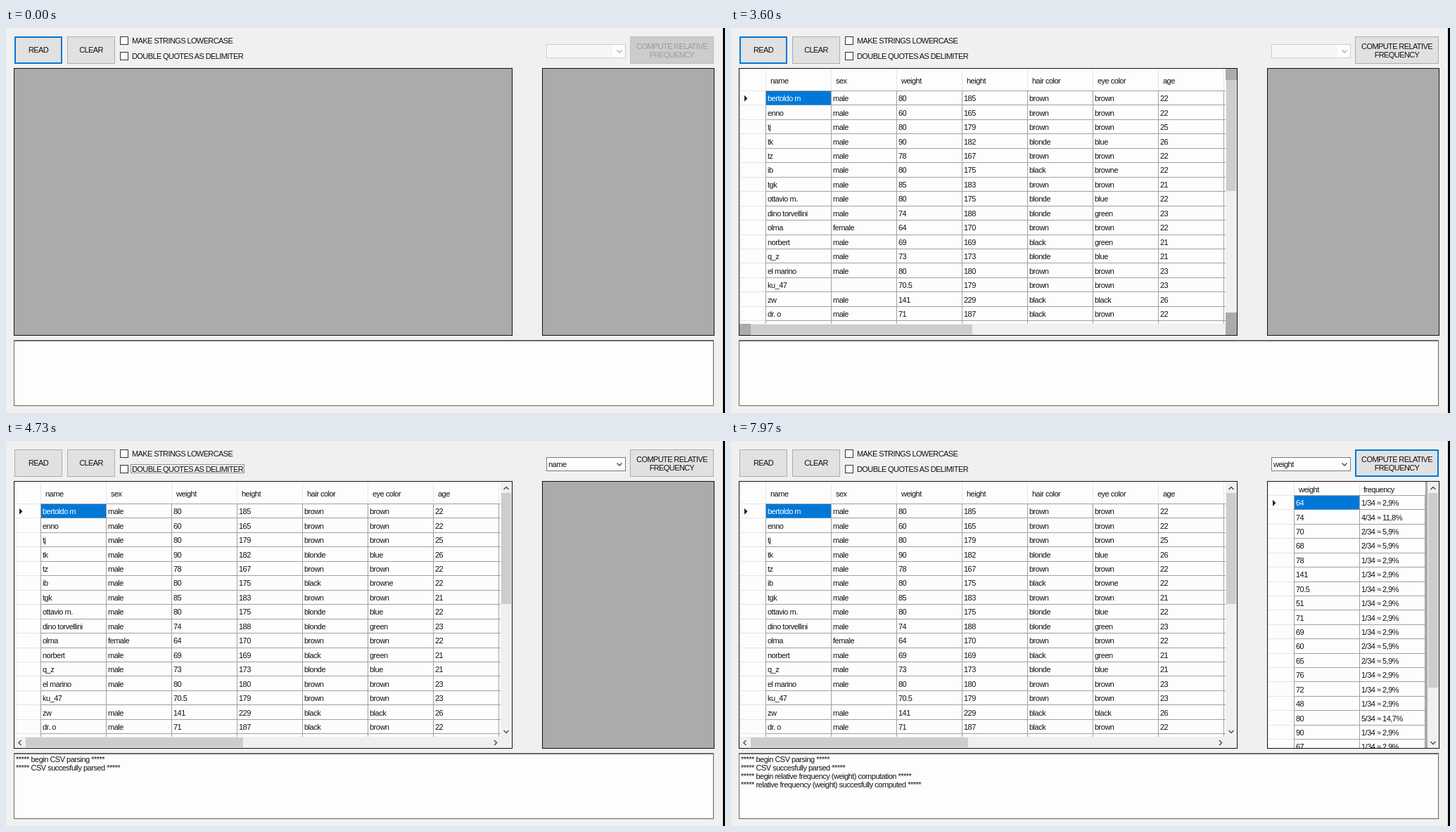
An HTML page that plays this animation: 1022 px wide and 548 px high, repeating every 8000 ms.

```html
<!DOCTYPE html>
<html lang="en">
<head>
<meta charset="utf-8">
<title>CSV frequency tool</title>
<style>
html, body { margin: 0; width: 100%; height: 100%; overflow: hidden; background: #f0f0f0; }
svg { display: block; }
text { font: 11px "Liberation Sans", Arial, sans-serif; letter-spacing: -.5px; white-space: pre; fill: #111; }
.caps { letter-spacing: -.6px; }
</style>
</head>
<body>
<svg id="stage" width="1022" height="548" viewBox="0 0 1022 548"></svg>
<script>
const LOOP = 8000;
const BLUE = '#0078d7', GRAY = '#ababab', FACE = '#f0f0f0', WHITE = '#fdfdfd';
const GRID = '#a0a0a0', FAINT = '#e6e6e6', THUMB = '#cdcdcd';
const stage = document.getElementById('stage');

function add(parent, tag, attrs = {}, content) {
  const el = document.createElementNS('http://www.w3.org/2000/svg', tag);
  for (const key in attrs) el.setAttribute(key, attrs[key]);
  if (content !== undefined) el.textContent = content;
  parent.appendChild(el);
  return el;
}
const group = (parent = stage) => add(parent, 'g');
const box = (parent, x, y, width, height, fill) => add(parent, 'rect', { x, y, width, height, fill });
const frame = (parent, x, y, width, height, fill, stroke) =>
  add(parent, 'rect', { x: x + .5, y: y + .5, width: width - 1, height: height - 1, fill, stroke });
const label = (parent, x, y, content, attrs) => add(parent, 'text', { x, y, ...attrs }, content);
const line = (parent, d, stroke, width = 1) =>
  add(parent, 'path', { d, stroke, fill: 'none', 'stroke-width': width });
const show = (el, on) => el.setAttribute('display', on ? 'inline' : 'none');

// Chevron pointing along (dx, dy)
function chevron(parent, x, y, dx, dy, color = '#505050') {
  const point = side => `${x - dx * 2 + dy * 3.5 * side} ${y - dy * 2 + dx * 3.5 * side}`;
  return line(parent, `M${point(-1)}L${x + dx * 1.5} ${y + dy * 1.5}L${point(1)}`, color, 1.5);
}

function button(x, width, lines) {
  const g = group();
  const face = frame(g, x, 12, width, 39, '#e1e1e1', '#adadad');
  const ring = add(g, 'rect', { x: x + 1, y: 13, width: width - 2, height: 37, fill: 'none', stroke: BLUE, 'stroke-width': 2 });
  const texts = lines.map((s, i) => label(g, x + width / 2, 35 + 12 * i - 6 * (lines.length - 1) + (lines.length - 1), s,
    { class: 'caps', 'text-anchor': 'middle' }));
  return (focused, enabled = true) => {
    show(ring, focused);
    face.setAttribute('fill', enabled ? '#e1e1e1' : '#cccccc');
    face.setAttribute('stroke', enabled ? '#adadad' : '#bfbfbf');
    texts.forEach(t => t.style.fill = enabled ? '#111' : '#9a9aa4');
  };
}

function checkbox(y, caption) {
  frame(stage, 162, y, 12, 12, WHITE, '#333');
  label(stage, 179, y + 10, caption, { class: 'caps' });
}

let clipCount = 0;
function table(parent, { left, top, right, bottom, headerBottom, columns, headerX, headers, rows, step }) {
  const id = 'clip' + clipCount++;
  box(add(parent, 'clipPath', { id }), left, top, right - left, bottom - top);
  const g = add(parent, 'g', { 'clip-path': `url(#${id})` });
  box(g, left, top, right - left, bottom - top, WHITE);
  line(g, columns.map(x => `M${x + .5} ${top}V${headerBottom}`).join(''), FAINT);
  line(g, columns.map(x => `M${x + .5} ${headerBottom}V${bottom}`).join(''), GRID);
  for (let i = 0; i <= rows.length; i++) {
    const y = Math.round(headerBottom + i * step) - .5;
    line(g, `M${left} ${y}H${columns[0]}`, FAINT);
    line(g, `M${columns[0]} ${y}H${right}`, GRID);
  }
  box(g, columns[0] + 1, headerBottom, columns[1] - columns[0] - 1, step - 1, BLUE);
  const middle = headerBottom + step / 2;
  add(g, 'path', { d: `M${left + 7} ${middle - 4.5}l4.5 4.5l-4.5 4.5z`, fill: '#222' });
  headers.forEach((s, c) => label(g, columns[c] + headerX[c], (top + headerBottom) / 2 + 5, s));
  rows.forEach((row, r) => row.forEach((s, c) =>
    label(g, columns[c] + 3, Math.round(middle + r * step + 4), s, r + c ? {} : { style: 'fill:#fff' })));
}

// Static interface
box(stage, 0, 0, 1022, 548, FACE);
box(stage, 1019, 0, 3, 548, '#000');
const readButton = button(12, 68, ['READ']);
const clearButton = button(87, 68, ['CLEAR']);
const computeButton = button(887, 119, ['COMPUTE RELATIVE', 'FREQUENCY']);
clearButton(false);
checkbox(12, 'MAKE STRINGS LOWERCASE');
checkbox(34, 'DOUBLE QUOTES AS DELIMITER');
const checkFocus = add(stage, 'rect', { x: 177.5, y: 33.5, width: 161, height: 12, fill: 'none', stroke: '#333', 'stroke-dasharray': '1 1' });
frame(stage, 11, 57, 709, 381, GRAY, '#111');
frame(stage, 762, 57, 245, 381, GRAY, '#111');
box(stage, 11, 444, 996, 95, FAINT);
box(stage, 11, 444, 995, 94, '#696969');
box(stage, 12, 446, 993, 91, WHITE);

// Drop-down field
const comboFrame = frame(stage, 768, 23, 113, 20, WHITE, '#7a7a7a');
const comboFill = box(stage, 770, 25, 92, 16, '#f6f6f6');
const comboArrow = chevron(stage, 872, 33.5, 0, 1);
const comboMark = box(stage, 770, 26, 0, 14, BLUE);
const comboText = label(stage, 771, 37, '');

// Data grid
const dataGrid = group();
const people = `bertoldo m|male|80|185|brown|brown|22
enno|male|60|165|brown|brown|22
tj|male|80|179|brown|brown|25
tk|male|90|182|blonde|blue|26
tz|male|78|167|brown|brown|22
ib|male|80|175|black|browne|22
tgk|male|85|183|brown|brown|21
ottavio m.|male|80|175|blonde|blue|22
dino torvellini|male|74|188|blonde|green|23
olma|female|64|170|brown|brown|22
norbert|male|69|169|black|green|21
q_z|male|73|173|blonde|blue|21
el marino|male|80|180|brown|brown|23
ku_47||70.5|179|brown|brown|23
zw|male|141|229|black|black|26
dr. o|male|71|187|black|brown|22`.split('\n').map(row => row.split('|'));
table(dataGrid, {
  left: 12, top: 58, right: 703, bottom: 421, headerBottom: 90, step: 20.45,
  columns: Array.from({ length: 8 }, (_, i) => 49 + 93 * i),
  headerX: Array(7).fill(7),
  headers: ['name', 'sex', 'weight', 'height', 'hair color', 'eye color', 'age'],
  rows: people
});
box(dataGrid, 703, 58, 16, 379, FACE);
box(dataGrid, 12, 421, 691, 16, FACE);
box(dataGrid, 704, 74, 14, 158, THUMB);
const sideThumb = box(dataGrid, 28, 422, 309, 14, THUMB);
const unpainted = group(dataGrid);
box(unpainted, 703, 58, 16, 16, GRAY);
box(unpainted, 703, 405, 16, 32, GRAY);
box(unpainted, 12, 421, 16, 16, GRAY);
const arrows = group(dataGrid);
chevron(arrows, 711, 67, 0, -1);
chevron(arrows, 711, 414, 0, 1);
chevron(arrows, 19.5, 429.5, -1, 0);
chevron(arrows, 696, 429.5, 1, 0);

// Frequency grid
const resultGrid = group();
const share = { 1: '2,9', 2: '5,9', 4: '11,8', 5: '14,7' };
const counts = '64:1 74:4 70:2 68:2 78:1 141:1 70.5:1 51:1 71:1 69:1 60:2 65:2 76:1 72:1 48:1 80:5 90:1 67:1';
table(resultGrid, {
  left: 763, top: 58, right: 987, bottom: 437, headerBottom: 78, step: 20.42,
  columns: [800, 893, 986], headerX: [7, 6], headers: ['weight', 'frequency'],
  rows: counts.split(' ').map(pair => {
    const [value, n] = pair.split(':');
    return [value, `${n}/34 ≈ ${share[n]}%`];
  })
});
box(resultGrid, 990, 58, 16, 379, FACE);
box(resultGrid, 991, 74, 14, 277, THUMB);
chevron(resultGrid, 998, 67, 0, -1);
chevron(resultGrid, 998, 430, 0, 1);

const logLines = ['begin CSV parsing', 'CSV succesfully parsed',
  'begin relative frequency (weight) computation', 'relative frequency (weight) succesfully computed']
  .map((s, i) => label(stage, 14, 457 + 12 * i, `***** ${s} *****`));

const TIMES = { loaded: 3600, parsed: 3850, comboFocus: 5150, sex: 5500, weight: 6300, compute: 6900, result: 7400 };

function render(t) {
  const past = name => t >= TIMES[name];
  const parsed = past('parsed');
  const comboFocused = past('comboFocus') && !past('compute');
  readButton(!parsed);
  computeButton(past('compute'), past('loaded'));
  show(checkFocus, parsed && !past('comboFocus'));

  comboFrame.setAttribute('stroke', comboFocused ? BLUE : parsed ? '#7a7a7a' : '#cccccc');
  show(comboFill, !parsed);
  comboArrow.setAttribute('stroke', parsed ? '#505050' : '#b4b4b4');
  comboText.textContent = !parsed ? '' : past('weight') ? 'weight' : past('sex') ? 'sex' : 'name';
  comboText.style.fill = comboFocused ? '#fff' : '#111';
  comboMark.setAttribute('width', comboFocused ? comboText.getComputedTextLength() + 2 : 0);

  show(dataGrid, past('loaded'));
  show(unpainted, !parsed);
  show(arrows, parsed);
  sideThumb.setAttribute('width', parsed ? 309 : 315);
  show(resultGrid, past('result'));
  logLines.forEach((el, i) => show(el, i < 2 ? parsed : past('result')));
}

const start = performance.now();
function tick() {
  render((performance.now() - start) % LOOP);
  requestAnimationFrame(tick);
}
tick();
</script>
</body>
</html>
```
